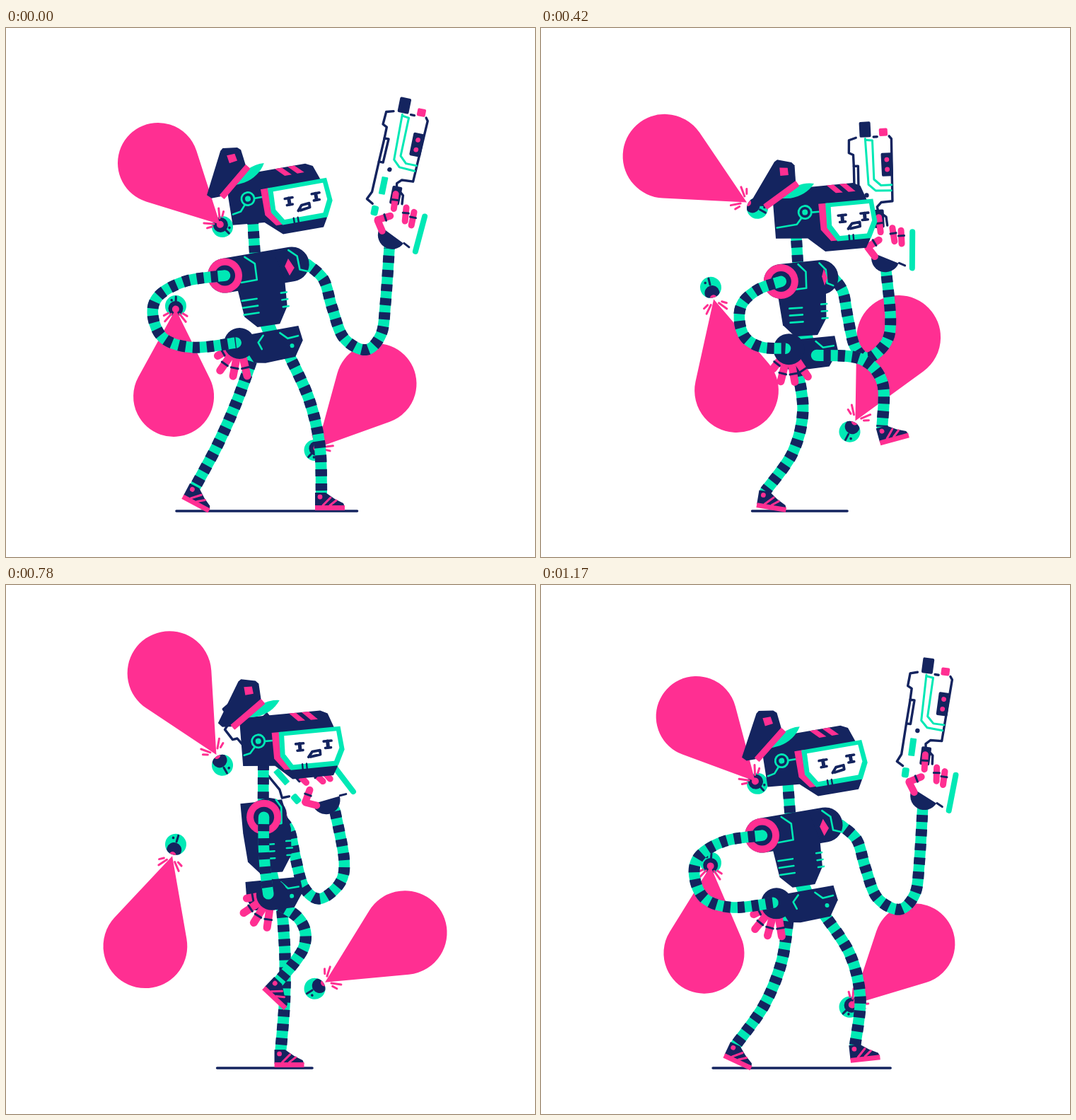
Recreate the animation shown at these times as an HTML page with a canvas. Size 748 by 748 pixels, loop 1200 ms.

```html
<!DOCTYPE html>
<html lang="en">
<head>
<meta charset="utf-8">
<title>Robot patrol</title>
<style>
  html, body { margin: 0; width: 100%; height: 100%; overflow: hidden; background: #fff; }
  canvas { display: block; width: 100vmin; height: 100vmin; }
</style>
</head>
<body>
<canvas width="748" height="748"></canvas>
<script>
const ctx = document.querySelector('canvas').getContext('2d');
const PINK = '#ff2f92', NAVY = '#14245f', TEAL = '#00e8b5', WHITE = '#fff';
const LOOP = 1200, STEP = 600, TICK = 30;

const cos = degrees => Math.cos(degrees * Math.PI / 180);
const sin = degrees => Math.sin(degrees * Math.PI / 180);
const mix = (a, b, k) => a + (b - a) * k;

function rotated(x, y, degrees) {
  const c = cos(degrees), s = sin(degrees);
  return [x * c - y * s, x * s + y * c];
}
function trace(p) {
  ctx.beginPath();
  for (let i = 0; i < p.length; i += 2) ctx.lineTo(p[i], p[i + 1]);
}
function fill(color) {
  ctx.fillStyle = color;
  ctx.fill();
}
function poly(color, ...p) {
  trace(p);
  fill(color);
}
function line(color, width, ...p) {
  trace(p);
  ctx.strokeStyle = color;
  ctx.lineWidth = width;
  ctx.stroke();
}
function disc(color, x, y, r) {
  ctx.beginPath();
  ctx.arc(x, y, r, 0, 7);
  fill(color);
}
function rect(color, cx, cy, w, h, r = 1) {
  ctx.beginPath();
  ctx.roundRect(cx - w / 2, cy - h / 2, w, h, r);
  fill(color);
}
function within(x, y, degrees, draw) {
  ctx.save();
  ctx.translate(x, y);
  ctx.rotate(degrees * Math.PI / 180);
  draw();
  ctx.restore();
}

// Striped hose along a smooth curve through [x, y] points.
function hose(points, width = 15.5) {
  const last = points.length - 1;
  const at = i => points[Math.min(last, Math.max(0, i))];
  ctx.beginPath();
  ctx.moveTo(...points[0]);
  for (let i = 0; i < last; i++) {
    const [a, b, c, d] = [at(i - 1), at(i), at(i + 1), at(i + 2)];
    ctx.bezierCurveTo(
      b[0] + (c[0] - a[0]) / 6, b[1] + (c[1] - a[1]) / 6,
      c[0] - (d[0] - b[0]) / 6, c[1] - (d[1] - b[1]) / 6, ...c);
  }
  ctx.strokeStyle = TEAL;
  ctx.lineWidth = width;
  ctx.stroke();
  ctx.save();
  ctx.lineCap = 'butt';
  ctx.setLineDash([10, 10]);
  ctx.lineDashOffset = 10;
  ctx.strokeStyle = NAVY;
  ctx.lineWidth = width + .5;
  ctx.stroke();
  ctx.restore();
}

// All joints follow from the loop angle (one full patrol) and the step angle (one stride).
function poseAt(t) {
  const turn = 360 * t / LOOP, stride = 2 * turn;
  const facing = cos(turn - 37);
  const tilt = -5 - 3.5 * cos(stride);
  const waist = [372 - 3 * cos(stride), 418 - 15 * sin(stride)];
  const pelvis = [380, 446 - 12 * sin(stride)];
  const onTorso = (x, y) => {
    const [dx, dy] = rotated(x, y, tilt);
    return [waist[0] + dx, waist[1] + dy];
  };
  return {
    turn, stride, facing, tilt, waist, pelvis, onTorso,
    nearShoulder: onTorso(-28 - 26 * facing, -76),
    farShoulder: onTorso(28 + 24 * facing, -78),
    nearHand: [pelvis[0] - 34 - 26 * facing, pelvis[1] - 1 - 4 * sin(turn)],
    gun: [
      499 + 57 * cos(turn - 22) - 6 * cos(stride),
      308 - 14 * sin(stride) - 8 * cos(stride) - 8 * cos(turn - 25)],
    gunTilt: -9.5 + 31.5 * cos(turn - 48),
    head: [393.5 - 12 * cos(stride + 8), 247 - 22 * sin(stride + 6)],
    headTilt: tilt - 1.5
  };
}

function drone(x, y, aim, { turn }) {
  const swing = cos(turn);
  const reach = 12.5 - 8 * swing, far = 142 - 14 * swing, r = 58.5 - 1.5 * swing;
  within(x, y - 16.5 + 16.5 * swing, aim - 19 * sin(turn), () => {
    disc(TEAL, 0, 0, 15);
    ctx.save();
    ctx.clip();
    disc(NAVY, 2 + reach * .35, 0, 10.5);
    disc(PINK, Math.min(reach, 16), 0, 5);
    ctx.restore();
    line(NAVY, 3, -4, 0, -13, 0);
    disc(NAVY, -8, 6, 1.8);

    ctx.translate(reach, 0);
    const dist = far - reach, tangent = Math.acos(r / dist);
    ctx.beginPath();
    ctx.moveTo(0, 0);
    ctx.arc(dist, 0, r, Math.PI + tangent, Math.PI - tangent);
    fill(PINK);
    for (const side of [-1, 1]) {
      line(PINK, 3, ...rotated(9, 0, 40 * side), ...rotated(23, 0, 40 * side));
      line(PINK, 3, ...rotated(12, 0, 60 * side), ...rotated(19, 0, 60 * side));
    }
  });
}

function finger(x0, y0, x1, y1, width) {
  line(PINK, width, x0, y0, x1, y1);
  const dx = x1 - x0, dy = y1 - y0, half = width * .45 / Math.hypot(dx, dy);
  const mx = mix(x0, x1, .6), my = mix(y0, y1, .6);
  line(NAVY, 3, mx + dy * half, my - dx * half, mx - dy * half, my + dx * half);
}

function gun({ gun: [x, y], gunTilt }) {
  within(x, y, gunTilt, () => {
    disc(NAVY, 0, 0, 20);
    poly(WHITE, -38, -172, 17, -172, 14, -80, -4, -77, 2, -44, 40, -37, 37, 17, -15, -7, -36, -38, -43, -45);
    rect(NAVY, -19.6, -183, 16, 22, 2);
    rect(PINK, 6, -178, 12, 11, 2);
    line(NAVY, 3.4, -33, -172, -43, -169, -44, -151, -38, -148, -38, -132);
    line(NAVY, 3.4, -38, -132, -32, -132, -33, -98, -39, -98, -38, -132);
    line(NAVY, 3.4, -39, -98, -40, -54, -45, -43, -36, -38);
    line(NAVY, 3.4, 14, -172, 17, -168, 14, -80, -2, -79, -8, -73, -7, -67, 4, -58, 5, -46);
    line(NAVY, 3.4, -8, -172, -3, -172);
    line(TEAL, 3, -20, -170, -18.6, -105, -9, -96, 13, -95);
    line(TEAL, 3, -18, -168, -10, -167, -10.5, -112, -1, -103, 14, -103);
    rect(NAVY, 9, -132, 16, 33, 2);
    disc(PINK, 9, -139, 3.4);
    disc(PINK, 9, -125, 3.4);
    disc(NAVY, -22, -90, 3.2);
    rect(TEAL, -26, -66, 9, 25);
    rect(TEAL, -31, -29, 10, 14, 3);
    rect(NAVY, -6, -56, 14, 26, 2);
    line(TEAL, 8, 40, -35, 37, 16);
    line(NAVY, 3, 19, 8, 27, 12);
    finger(-5, -37, -6.5, -58, 9);
    finger(14, -23, 12, -42, 9);
    finger(24, -19, 24, -38, 9);
    line(PINK, 10, -15, -3, -24, -16, -24, -17);
    finger(-24, -17, -8, -26, 10);
  });
}

// Hangs from the far shoulder to a low point, then rises to the wrist.
function farArm({ facing, farShoulder, gun, gunTilt, pelvis }) {
  const [sx, sy] = [farShoulder[0] + 17 + 6 * facing, farShoulder[1]];
  const [dx, dy] = rotated(0, 19, gunTilt);
  const [ex, ey] = [gun[0] + dx, gun[1] + dy];
  const [lx, ly] = [gun[0] - 24 - 16 * facing, pelvis[1] + 9];
  const sway = 4 + (498 - gun[0]) * .2;
  const hang = (u, v) => [mix(sx, lx, u), mix(sy, ly, v)];
  hose([
    [sx, sy], hang(.28, .18), hang(.42, .5), hang(.62, .86), [lx, ly],
    [ex + sway - 6, ly - 22], [ex + sway, mix(ey, ly, .55)], [ex, ey]]);
}

// A bow from shoulder to hip that flattens as the body turns sideways.
function nearArm({ facing, nearShoulder: [sx, sy], nearHand: [hx, hy] }) {
  const bow = 61 + 61 * facing, open = Math.min(1, bow / 100);
  const bowX = [0, .52, .9, 1, .88, .52, 0], bowY = [0, .08, .3, .6, .94, 1.07, 1];
  hose(bowX.map((k, i) => {
    const along = i / 6;
    return [mix(sx, hx, along) - bow * k, mix(sy, hy, mix(along, bowY[i], open))];
  }));
}

function nearHand({ turn, nearHand: [x, y] }) {
  for (let i = 0; i < 4; i++) {
    const angle = 149 - 24 * i - 26 * sin(turn), length = i ? 48 : 36;
    const [dx, dy] = rotated(length, 0, angle);
    finger(x + 5 + dx * .4, y + dy * .4, x + 5 + dx, y + dy, 11);
  }
  disc(NAVY, x + 5, y + 1, 22);
}

// First half of the cycle the foot slides back on the ground, second half it swings forward.
function footAt(t) {
  const u = t % STEP / STEP;
  if (t % LOOP < STEP) {
    return { x: 446 - 178 * u - 5 * sin(180 * u), y: 657 - 9 * u ** 4, lift: 0,
      tilt: 28 * Math.max(0, (u - .55) / .45) };
  }
  const lift = sin(180 * u) ** 1.6, forward = sin(180 * u ** 1.15) ** 1.6;
  return { x: mix(268, 446, u) + 112 * forward, y: mix(648, 657, u) - 127 * lift, lift,
    tilt: 28 * (1 - u) + 25 * sin(360 * u) };
}

function leg(t) {
  const { turn, pelvis } = poseAt(t), foot = footAt(t);
  const hx = 375 + 25 * cos(turn), hy = pelvis[1] + 16 - 15 * foot.lift;
  const dx = foot.x - hx, dy = foot.y - hy, length = Math.hypot(dx, dy);
  const bend = 5 + .25 * Math.sqrt(Math.max(0, 203 ** 2 - length ** 2));
  const joint = k => [hx + dx * k + dy / length * bend, hy + dy * k - dx / length * bend];
  hose([[hx, hy], joint(1 / 3), joint(2 / 3), [foot.x, foot.y]], 16);
  within(foot.x, foot.y, foot.tilt, () => {
    poly(NAVY, -9, 0, 6, 0, 19, 9, 31, 15, 33, 20, -9, 20);
    poly(PINK, -9, 18, 33, 18, 33, 25, -9, 25);
    disc(PINK, -2, 6, 3.4);
    line(PINK, 3, 2, 18, 13, 7);
    line(PINK, 3, 12, 18, 21, 11);
  });
}

function pelvis({ pelvis: [x, y], tilt }) {
  within(x, y, tilt + 2, () => {
    poly(NAVY, -41, -16, 36, -21, 40, 0, 27, 22, -16, 26, -32, 24, -40, 8);
    line(TEAL, 2.6, 9, -14, 19, -5, 34, -7);
    line(TEAL, 2.6, -15, -13, -23, -4, -19, 6);
    disc(TEAL, 24, 6, 3);
  });
}

function torso({ facing, tilt, waist, nearShoulder, farShoulder, onTorso }) {
  line(NAVY, 49, ...nearShoulder, ...farShoulder);
  within(...waist, tilt, () => {
    poly(NAVY, -35, -97, 24, -99, 34, -58, 32, -20, 18, 3, -14, 3, -30, -14, -34, -55);
    const rib = -19 - 14 * facing;
    for (const y of [-37, -27, -17]) {
      line(TEAL, 2.6, rib, y, rib + 18 + 4 * facing, y);
      line(TEAL, 2.6, 26, y - 3, 34, y - 3);
    }
  });
  const width = .8 + .25 * facing;
  const strap = ([x, y], ...p) => within(x, y, tilt + 6, () =>
    line(TEAL, 2.6, ...p.map((v, i) => i % 2 ? v : v * width)));
  strap(nearShoulder, 29, -25, 43, -15, 45, 8, 23, 11);
  strap(farShoulder, -4, -20, 8, -11, 11, 8, 22, 11);

  const gx = waist[0] + 28 + 5 * facing, gy = waist[1] - 80, half = 3.8 + 3.8 * facing;
  poly(PINK, gx - half * .3, gy - 12, gx + half, gy + 1, gx, gy + 12, gx - half, gy - 1);
  disc(PINK, ...nearShoulder, 24.5);
  disc(NAVY, ...nearShoulder, 14.5);
}

function neck({ onTorso, head, headTilt }) {
  const [dx, dy] = rotated(-37, 22, headTilt);
  hose([onTorso(-3, -92), [head[0] + dx, head[1] + dy]]);
}

function eye(x, y) {
  line(NAVY, 3.6, x - 5.5, y - 4.5, x + 5.5, y - 4.5);
  line(NAVY, 5, x, y - 4, x, y + 4);
  line(NAVY, 3.6, x - 4, y + 5, x + 4, y + 5);
}

function cap(stride) {
  within(-53, -42.5 - 8 * sin(stride - 38), -34.5 - 5.5 * cos(stride - 25), () => {
    ctx.beginPath();
    ctx.moveTo(-4, 4);
    ctx.lineTo(24, 3);
    ctx.quadraticCurveTo(38, 6, 47, 15);
    ctx.quadraticCurveTo(28, 22, 8, 12);
    fill(TEAL);
    poly(NAVY, 20, -43, 25, -43, 39, -28, 40, -22, 28, -3, -29, -1, -39, -9, -40, -17);
    rect(PINK, 0, 1, 57, 9);
    poly(PINK, 21, -32, 30, -25, 25, -16, 15, -22);
  });
}

function head({ turn, stride, head: [x, y], headTilt }) {
  // Left edge of the visor; the other features keep their spacing to it.
  const edge = -14 + 13 * sin(turn - 20);
  const ear = edge - 20, face = edge / 2 + 47, gap = (78 - edge) / 5, shift = edge * .35;
  within(x, y, headTilt, () => {
    poly(NAVY, -65, -43, -60, -45, 50, -45, 60, -40, 67, -20, 67, 36, 60, 48, 2, 48, -21, 27, -66, 23);
    for (const d of [13 + shift, 31 + shift])
      poly(PINK, d, -45, d + 10, -45, d + 22, -33, d + 12, -33);
    line(TEAL, 2.6, -63, 8, ear - 13, 6, ear - 6, -2);
    line(TEAL, 2.6, ear + 10, -9, edge, -9);
    disc(TEAL, ear, -10, 10.5);
    disc(NAVY, ear, -10, 7.7);
    disc(TEAL, ear, -10, 4);
    poly(PINK, edge, -20, edge + 14, -20, edge + 12, 12, edge + 24, 34, edge + 13, 34, edge, 17);
    poly(TEAL, edge + 10, -20, 76, -20, 79, 13, 68, 35, edge + 22, 35, edge + 9, 15);
    poly(WHITE, edge + 17, -14, 70, -14, 72, 10, 63, 28, edge + 26, 28, edge + 16, 12);
    for (const d of [39, 45]) line(NAVY, 2.4, edge + d, 28, edge + d, 36);
    eye(face - gap, 3.5);
    eye(face + gap, 3.5);
    line(NAVY, 3.8, face - 9, 19, face - 3, 12, face + 8, 11, face + 8, 17, face - 6, 19);
    cap(stride);
  });
}

function draw(t) {
  const pose = poseAt(t), swing = t % STEP / STEP;
  const nearInFront = t < STEP && swing > .1 && swing < .8;

  ctx.fillStyle = WHITE;
  ctx.fillRect(0, 0, 748, 748);
  ctx.lineCap = ctx.lineJoin = 'round';

  drone(306, 281, 224.7, pose);
  drone(240, 393, 91.3, pose);
  drone(436.5, 597, -47.2, pose);
  line(NAVY, 3.6, 285 - 44 * cos(pose.stride), 683, 448 + 48.5 * cos(pose.stride), 683);

  farArm(pose);
  gun(pose);
  neck(pose);
  line(TEAL, 20, ...pose.waist, ...pose.pelvis);
  leg(t % STEP);
  if (!nearInFront) leg(t % STEP + STEP);
  pelvis(pose);
  torso(pose);
  if (nearInFront) leg(t % STEP + STEP);
  head(pose);
  nearHand(pose);
  nearArm(pose);
}

function play() {
  draw(Math.floor(performance.now() / TICK) * TICK % LOOP);
  requestAnimationFrame(play);
}
play();
</script>
</body>
</html>
```
